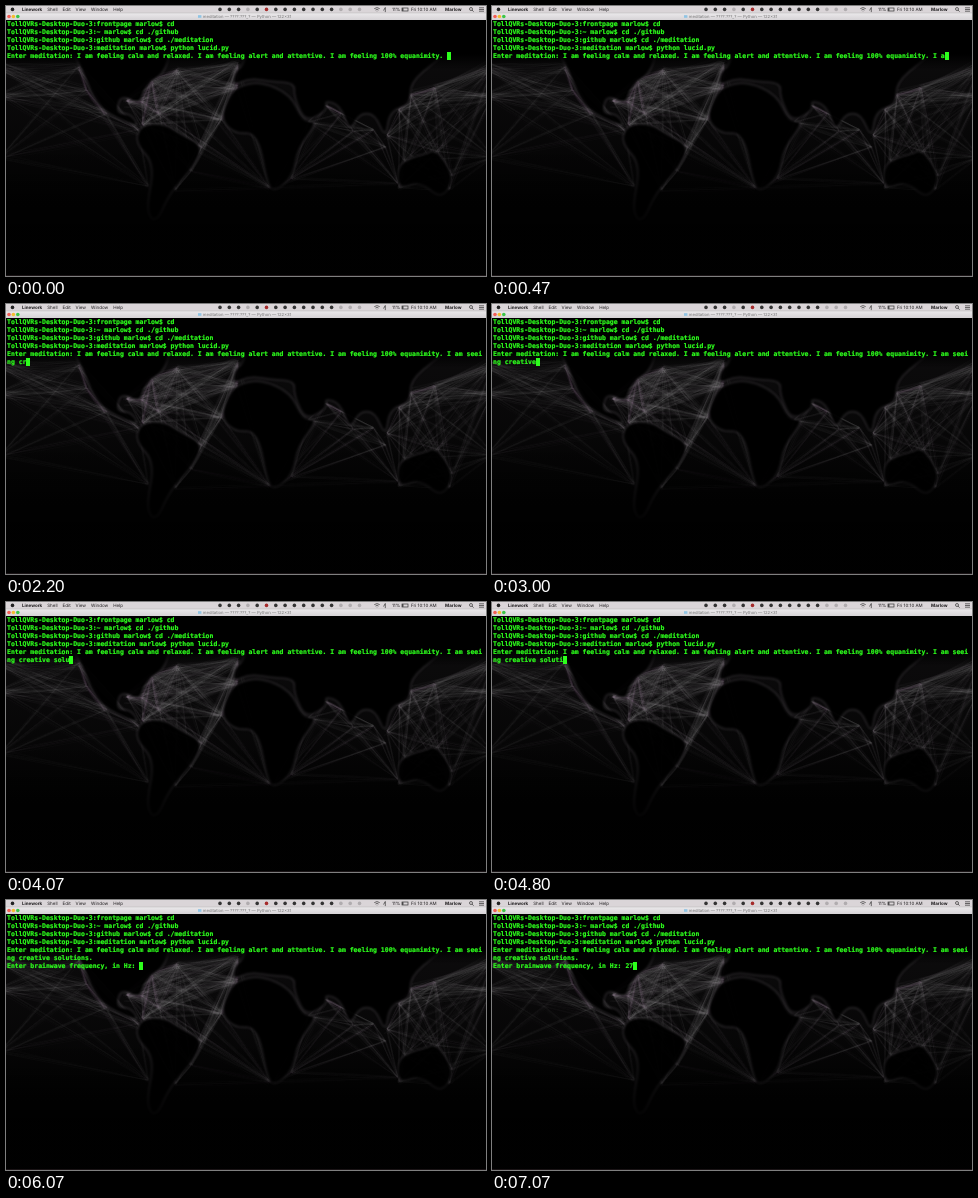
Write an HTML page with a canvas that moves like this. It is 480 by 270 pixels and loops after 8000 ms.

```html
<!DOCTYPE html>
<html lang="en">
<head>
<meta charset="utf-8">
<title>Meditation prompt</title>
<style>
html, body { margin: 0; width: 100%; height: 100%; overflow: hidden; background: #000; }
#stage { position: relative; width: 480px; height: 270px; overflow: hidden; background: #000; }
canvas, svg { position: absolute; left: 0; top: 0; }
svg text { font-family: Inter, "Open Sans", sans-serif; font-size: 4.5px; fill: #1c1a1c; text-rendering: geometricPrecision; }
svg .strong { font-weight: 700; }
svg .title { font-size: 4.2px; fill: #777; text-anchor: middle; }
#shell {
  position: absolute; left: 1px; top: 14px; margin: 0; white-space: pre;
  font: bold 6.48px/8px "DejaVu Sans Mono", monospace;
  color: #2dfe1c; -webkit-text-stroke: .2px #2dfe1c; text-rendering: geometricPrecision;
}
#cursor { display: inline-block; width: 1ch; height: 8px; vertical-align: top; background: #2dfe1c; }
</style>
</head>
<body>
<div id="stage">
  <canvas id="map" width="480" height="270"></canvas>
  <svg id="bars" width="480" height="270" viewBox="0 0 480 270">
    <defs>
      <linearGradient id="bar" x2="0" y2="1">
        <stop stop-color="#ebe9eb"/><stop offset="1" stop-color="#d6d3d6"/>
      </linearGradient>
    </defs>
    <rect width="480" height="7" fill="#dad5d8"/>
    <rect y="7" width="480" height="7" fill="url(#bar)"/>
    <rect y="6.8" width="480" height=".4" fill="#aaa"/>
    <rect y="269" width="480" height="1" fill="#1a1416"/>
    <circle cx="6.5" cy="3.4" r="1.8" fill="#222"/>
    <circle cx="3" cy="10.5" r="1.8" fill="#f25f57"/>
    <circle cx="7.4" cy="10.5" r="1.8" fill="#f5bd30"/>
    <circle cx="11.8" cy="10.5" r="1.8" fill="#3cc648"/>
    <rect x="192" y="9.2" width="3.4" height="2.6" fill="#8fc4e4"/>
    <text class="title" x="241" y="12">meditation — ????:???_? — Python — 122×31</text>
    <text x="16" y="5.1"><tspan class="strong">Linework</tspan><tspan dx="5">Shell</tspan><tspan dx="5">Edit</tspan><tspan dx="5">View</tspan><tspan dx="5">Window</tspan><tspan dx="5">Help</tspan></text>
    <text x="386" y="5.1">11%</text>
    <text x="405" y="5.1">Fri 10:10 AM</text>
    <text x="439" y="5.1" class="strong">Marlow</text>
    <g fill="none" stroke="#333" stroke-width=".7">
      <path d="M368.3 2.6q2.7-2 5.4 0M369.5 4q1.5-1.1 3 0M371 5.2v.3M377.5 4.5l1.8-3v4.6"/>
      <rect x="396" y="2" width="6" height="3"/>
      <circle cx="465" cy="3" r="1.5"/><path d="M466 4l1.6 1.7M473 1.8h5M473 3.5h5M473 5.2h5"/>
    </g>
    <rect x="396.2" y="2.2" width="1.2" height="2.6" fill="#333"/>
  </svg>
  <pre id="shell"><span id="typed"></span><span id="cursor"></span></pre>
</div>
<script>
const LOOP = 8000;
const COLUMNS = 122;
const HOST = 'TollQVRs-Desktop-Duo-3';
const USER = 'marlow';
const prompt = (dir, command) => `${HOST}:${dir} ${USER}$ ${command}\n`;

const INTRO = prompt('frontpage', 'cd') + prompt('~', 'cd ./github') +
  prompt('github', 'cd ./meditation') + prompt('meditation', 'python lucid.py') +
  'Enter meditation: I am feeling calm and relaxed. I am feeling alert and attentive. ' +
  'I am feeling 100% equanimity. ';

// bursts of typing: start in ms, ms between keys, keys
const BURSTS = [
  [70, 130, 'I '], [400, 100, 'am '], [870, 150, 'seei'], [1400, 200, 'ng'],
  [2000, 90, ' cre'], [2470, 132, 'ative'], [3070, 260, ' s'], [3470, 165, 'olu'],
  [4670, 118, 'tions.'], [5530, 0, '\nEnter brainwave frequency, in Hz: '], [6600, 330, '27']
];

function textAt(t) {
  const keys = BURSTS.map(([start, gap, text]) =>
    [...text].filter((_, i) => start + i * gap <= t).join(''));
  return (INTRO + keys.join('')).replace(new RegExp(`.{${COLUMNS}}`, 'g'), '$&\n');
}

// ---- status icons ----
const bars = document.getElementById('bars');
for (let i = 0; i < 16; i++) {
  const icon = document.createElementNS(bars.namespaceURI, 'circle');
  const look = {
    cx: 214 + i * 9.3, cy: 3.4, r: 1.8,
    fill: i === 5 ? '#a52b2b' : '#333',
    opacity: i === 3 || i > 12 ? .25 : 1
  };
  for (const key in look) icon.setAttribute(key, look[key]);
  bars.append(icon);
}

// ---- world map of sea routes, points are longitude latitude ----
const ctx = document.getElementById('map').getContext('2d');
let seed = 11;
const random = () => (seed = (seed * 16807) % 2147483647) / 2147483647;
const jitter = spread => (random() + random() - random() - random()) * spread;
const points = text => text.split(',').map(p => p.trim().split(' ').map(Number));
const project = ([lon, lat]) => [
  241 + lon * 4 / 3,
  132 - 76.4 * Math.log(Math.tan(Math.PI / 4 + lat * Math.PI / 360))
];

const LANDS = {
  northAmerica: '-170 66, -135 59, -124 46, -115 28, -105 18, -80 7, -87 18, -98 18, -95 31, -80 24, -77 36, -58 46, -58 66',
  southAmerica: '-80 10, -62 11, -50 3, -32 -6, -42 -24, -58 -38, -68 -54, -76 -48, -69 -19, -84 -4',
  africa: '-7 36, 10 39, 33 31, 42 12, 54 13, 38 -8, 35 -26, 24 -36, 16 -36, 8 4, -9 3, -20 14, -14 30',
  eurasia: '-11 36, 2 41, 17 39, 36 38, 35 30, 44 11, 61 21, 58 27, 70 24, 77 4, 84 18, 96 18, 104 -1, 107 20, 123 24, 122 38, 142 50, 178 66, 5 66, -2 48, -9 45',
  australia: '113 -20, 113 -36, 130 -31, 146 -42, 156 -28, 142 -8, 134 -12, 124 -14'
};

// every port trades with every other port on its ocean
const OCEANS = {
  atlantic: '-7 48, -8 36, -19 14, 17 -35, -34 -7, -42 -24, -54 -36, -78 10, -66 18, -79 26, -72 40, -90 27, -52 45',
  indian: '20 -35, 33 -29, 46 12, 59 24, 71 18, 80 5, 95 6, 104 -7, 113 -32',
  westPacific: '105 2, 114 21, 123 31, 141 35, 118 -17, 143 -10, 154 -27, 152 -36, 114 -35, 184 47, 184 30, 184 -14',
  eastPacific: '-184 47, -184 30, -184 -14, -126 47, -120 33, -106 18, -81 6, -74 -34'
};

function drawRoutes(a, b) {
  const distance = Math.hypot(a[0] - b[0], a[1] - b[1]);
  const north = a[1] + b[1] > 40;
  const spread = (1 + distance * .05) * (north ? 1.5 : .6);
  const near = ([lon, lat]) => project([lon + jitter(spread * .4), lat + jitter(spread * .4)]);
  ctx.strokeStyle = `rgba(205,196,206,${north ? .028 : .02})`;
  for (let i = 0; i < (north ? 16 : 9); i++) {
    const from = near(a), to = near(b);
    const middle = from.map((v, axis) => (v + to[axis]) / 2 + jitter(spread));
    ctx.lineWidth = .6 + random() * 1.4;
    ctx.beginPath();
    ctx.moveTo(...from);
    ctx.quadraticCurveTo(...middle, ...to);
    ctx.stroke();
  }
}

function coast(outline) {
  const corners = points(outline).map(project);
  const halfway = (p, q) => [(p[0] + q[0]) / 2, (p[1] + q[1]) / 2];
  const path = new Path2D();
  path.moveTo(...halfway(corners.at(-1), corners[0]));
  corners.forEach((corner, i) =>
    path.quadraticCurveTo(...corner, ...halfway(corner, corners[(i + 1) % corners.length])));
  path.closePath();
  return path;
}

function shade(from, to, ...colors) {
  const gradient = ctx.createLinearGradient(0, from, 0, to);
  colors.forEach((color, i) => gradient.addColorStop(i / (colors.length - 1), color));
  ctx.fillStyle = gradient;
  ctx.fillRect(0, 0, 480, 270);
}

function drawMap() {
  shade(50, 200, '#0c0b0c', '#030303');
  ctx.filter = 'blur(.6px)';
  for (const ocean of Object.values(OCEANS)) {
    const ports = points(ocean);
    ports.forEach((port, i) => ports.slice(i + 1).forEach(other => drawRoutes(port, other)));
  }
  ctx.filter = 'blur(1px)';
  for (const outline of Object.values(LANDS)) {
    const path = coast(outline);
    ctx.fillStyle = 'rgba(0,0,0,.94)';
    ctx.fill(path);
    ctx.lineWidth = 1.6;
    ctx.strokeStyle = 'rgba(205,196,206,.17)';
    ctx.stroke(path);
  }
  ctx.filter = 'none';
  shade(48, 64, '#000', 'transparent');
  shade(140, 220, 'transparent', 'rgba(0,0,0,.85)');
}
drawMap();

// ---- typing ----
const typed = document.getElementById('typed');
const start = performance.now();

function draw() {
  const text = textAt((performance.now() - start) % LOOP);
  if (typed.textContent !== text) typed.textContent = text;
  requestAnimationFrame(draw);
}
draw();
</script>
</body>
</html>
```
